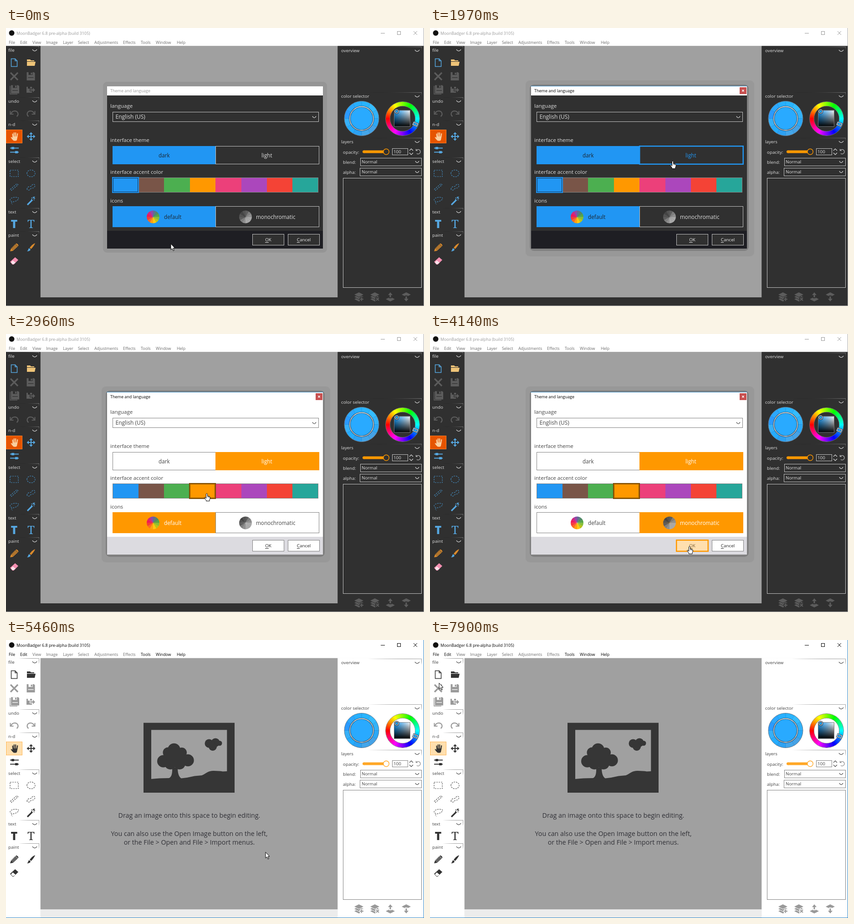
Write an HTML page with a canvas that moves like this. It is 918x610 px and loops after 8 s.

```html
<!DOCTYPE html>
<html lang="en">
<head>
<meta charset="utf-8">
<title>Theme and language</title>
<style>
html, body { margin: 0; width: 100%; height: 100%; overflow: hidden; }
canvas { display: block; }
</style>
</head>
<body>
<canvas id="stage" width="918" height="610"></canvas>
<script>
const c = document.getElementById('stage').getContext('2d');
const TAU = Math.PI * 2;
const LOOP = 8000;
const ORANGE = '#ff9800', BLUE = '#2196f3';
const SWATCHES = [BLUE, '#795548', '#4caf50', ORANGE, '#ec407a', '#ab47bc', '#f44336', '#26a69a'];

const DARK = {
  bg: '#303030', fg: '#dedede', line: '#c4c4c4', foot: '#1e1e23', rule: '#777', chosen: '#1d2731',
  icon: '#56a7e0', folder: '#efc478', off: '#5c5c5c', handBg: '#e65400', handEdge: '#ff7d26', hand: '#f9cf9f',
  dash: '#4489bb', pencil: '#d98a2c', brush: '#d98a2c', eraser: '#f48fb1', slider: ORANGE, status: '#303030', art: '#444'
};
const LIGHT = {
  bg: '#fff', fg: '#444', line: '#808080', foot: '#dcdbe0', rule: '#aaa', chosen: '#fff',
  icon: '#333', folder: '#333', off: '#9a9a9a', handBg: '#ffdfae', handEdge: '#ffb95c', hand: '#333',
  dash: '#555', pencil: '#333', brush: '#333', eraser: '#333', slider: '#ffa726', status: '#ececec', art: '#363636'
};

// time, x, y of the pointer tip
const POINTER = [
  [0, 362, 473], [150, 352, 472], [300, 342, 471], [610, 346, 466], [750, 368, 440], [900, 410, 400],
  [1050, 468, 345], [1200, 520, 300], [1350, 533, 291], [2240, 521, 304], [2370, 472, 336], [2500, 441, 349],
  [3110, 470, 372], [3240, 520, 400], [3370, 548, 414], [3820, 552, 425], [3980, 563, 452], [4140, 570, 465],
  [6080, 583, 464], [6220, 500, 460], [6360, 330, 448], [6500, 170, 432], [6640, 110, 422], [6780, 240, 412],
  [7060, 228, 396], [7200, 190, 340], [7340, 140, 265], [7480, 90, 195], [7620, 50, 140], [7760, 28, 105], [7900, 20, 94]
];

function box(x, y, w, h, fill, edge, lw = 1) {
  if (fill) { c.fillStyle = fill; c.fillRect(x, y, w, h); }
  if (edge) {
    c.strokeStyle = edge; c.lineWidth = lw;
    c.strokeRect(x + lw / 2, y + lw / 2, w - lw, h - lw);
  }
}
function shape(d, x, y, { fill, edge, w = 1, dash = [], flip = 1, cap = 'butt' }) {
  const p = new Path2D(d);
  c.save();
  c.translate(x, y);
  c.scale(flip, 1);
  c.lineCap = cap;
  if (fill) { c.fillStyle = fill; c.fill(p); }
  if (edge) { c.strokeStyle = edge; c.lineWidth = w; c.setLineDash(dash); c.stroke(p); }
  c.restore();
}
function disc(x, y, r, fill, edge, w = 1) {
  c.beginPath();
  c.arc(x, y, r, 0, TAU);
  if (fill) { c.fillStyle = fill; c.fill(); }
  if (edge) { c.strokeStyle = edge; c.lineWidth = w; c.stroke(); }
}
// y is the middle of the capitals
function text(s, x, y, size, color, align = 'left', font = '"Open Sans"', generic = 'sans-serif', weight = 400) {
  c.font = `${weight} ${size}px ${font}, ${generic}`;
  c.textAlign = align;
  c.fillStyle = color;
  c.fillText(s, x, y + size * 0.357);
}
function pie(x, y, r, colors) {
  colors.forEach((color, i) => {
    const a = i / colors.length * TAU - Math.PI / 2;
    c.beginPath();
    c.moveTo(x, y);
    c.arc(x, y, r, a, a + TAU / colors.length + 0.02);
    c.fillStyle = color;
    c.fill();
  });
}
const chevron = (x, y, color, w = 4) => shape(`M${-w} -2Q${-w / 2} 1.5 0 1.5T${w} -2`, x, y, { edge: color, w: 1.2 });

function header(label, x, y, x0, x1, th) {
  const g = c.createLinearGradient(x0, 0, x1, 0);
  g.addColorStop(0, 'transparent');
  g.addColorStop(1, th.rule);
  box(x0, y - 9, x1 - x0, 1, g);
  const v = c.createLinearGradient(0, y - 9, 0, y + 4);
  v.addColorStop(0, th.rule);
  v.addColorStop(1, 'transparent');
  box(x1 - 1, y - 9, 1, 13, v);
  text(label, x, y, 9.8, th.fg);
  chevron(x1 - 10, y, th.fg, 5);
}

function titleBar(active, ready) {
  box(0, 0, 918, 39.5, '#fff');
  const ink = active ? '#000' : '#999';
  disc(12.5, 11, 6, '#111');
  text('MoonBadger 6.8 pre-alpha (build 3105)', 23, 11.5, 8.9, ink);
  const menus = { File: 6, Edit: 31, View: 58, Image: 88, Layer: 125, Select: 158, Adjustments: 194, Effects: 257, Tools: 296, Window: 329, Help: 375 };
  for (const [name, x] of Object.entries(menus)) {
    const on = ready && /File|Edit|Tools|Window|Help/.test(name);
    text(name, x, 31.5, 8.9, on ? '#000' : '#6d6d6d');
  }
  box(823, 11, 9, 1, ink);
  box(859, 7, 8, 8, null, ink);
  shape('M-4 -4L4 4M4 -4L-4 4', 899, 11, { edge: ink });
}

function floppy(x, y, color, bg) {
  shape('M-9 -9H7L9 -7V9H-9Z', x, y, { fill: color });
  box(x - 5, y - 9, 9, 6, bg);
  box(x, y - 8, 3, 4, color);
  box(x - 6, y + 2, 12, 1.3, bg);
}

function toolbox(th, off) {
  box(0, 39.5, 75.5, 571, th.bg);
  [['file', 49], ['undo', 161], ['n-d', 212], ['select', 293], ['text', 404], ['paint', 455]]
    .forEach(([s, y]) => header(s, 5, y, 28, 73, th));
  const ink = th.icon;

  shape('M-6.5 -8.5H2L6.5 -4V8.5H-6.5ZM2 -8.5V-4H6.5', 18, 76, { edge: ink, w: 1.5 });
  shape('M-9 -7H-2L0 -5H7V-3H-9ZM-9 -2H10L8 7H-9Z', 55, 76, { fill: th.folder });
  shape('M-8 -8L8 8M8 -8L-8 8', 18, 106, { edge: off, w: 3.4 });
  floppy(54.5, 106, off, th.bg);
  floppy(20, 134.5, off, th.bg);
  shape('M-9 -9V9H7', 18, 136, { edge: off, w: 1.6 });
  shape('M-9 -7H3V-3H-2V3H3V6H-9ZM-6 -7V-3H-1V-7Z', 54, 136, { fill: off });
  shape('M-1 -1.5H5V-5L10 0L5 5V1.5H-1Z', 54, 136, { fill: off });
  [[18, 1], [55, -1]].forEach(([x, flip]) => {
    shape('M-7 1C-4 -7 8 -7 8.5 2Q8.5 5 5.5 7', x, 187, { edge: off, w: 2.2, flip });
    shape('M-8.5 -5V2H-1.5', x, 187, { edge: off, w: 2, flip });
  });

  box(0, 223, 36, 30, th.handBg, th.handEdge);
  shape('M-4.5 -5.5L-3.5 2M-1.2 -8V1M2.2 -8V1M6.3 -6L5 2', 19, 238, { edge: th.hand, w: 2.2, cap: 'round' });
  shape('M-4.5 0H6.2L5.5 5Q5 9.5 2 9.5H-1.5Q-4 9 -8.5 2Q-7.5 0 -4.5 3Z', 19, 238, { fill: th.hand });
  shape('M-7 0H7M0 -7V7', 55, 238, { edge: ink, w: 2 });
  shape('M0 -9.5L4 -5H-4ZM0 9.5L4 5H-4ZM-9.5 0L-5 -4V4ZM9.5 0L5 -4V4Z', 55, 238, { fill: ink });
  shape('M-9 -4.5H10M-9 4.5H10', 18, 268, { edge: ink, w: 2.2 });
  shape('M-6 -7H0V-2H-6ZM2 2H8V7H2Z', 18, 268, { fill: ink });

  const dashed = { edge: th.dash, w: 1.2, dash: [3, 2] };
  shape('M-9 -7H9V7H-9Z', 18, 319, dashed);
  shape('M-9 0A9 7.5 0 0 1 9 0A9 7.5 0 0 1 -9 0', 55, 319, dashed);
  shape('M-8.5 5L6 -7.5L8.5 -5L-6 7.5Z', 18, 349, dashed);
  shape('M-9 5Q-8 -1 -3 -1Q1 -1 2 -4Q5 -8 8 -5Q10 -1 5 2Q1 2 -1 4Q-5 9 -9 5', 55, 349, dashed);
  shape('M-5 3Q-12 0 -7 -4Q0 -8 8 -6Q13 -3 3 2L-4 4Q-8 6 -4 9', 18, 378, dashed);
  shape('M-8 9L3 -2', 55, 379, { edge: ink, w: 3.2 });
  shape('M5 -9V-5M1 -7L3 -5M9 -5H6M8 -9L6 -6M7 -1L6 -3M0 -3L2 -3', 55, 379, { edge: ink, w: 1.5 });

  text('T', 18, 430, 25, ink, 'center', '"Open Sans"', 'sans-serif', 800);
  text('T', 55, 430, 26, ink, 'center', '"Noto Serif"', 'serif');

  shape('M-9 9L-7 3L4 -8Q6 -9 9 -5Q10 -3 8 -2L-3 8Z', 18, 481, { fill: th.pencil });
  shape('M-6 4L5 -6M-4 6L7 -4M3 -7L8 -2', 18, 481, { edge: th.bg, w: 0.9 });
  shape('M9 -9Q3 -7 -3 1L0 4Q7 -3 9 -9Z', 55, 481, { fill: th.brush });
  shape('M-4 2L-1 5Q-2 9 -9 9Q-6 7 -6 4Z', 55, 481, { fill: th.icon });
  shape('M-9 2L2 -8L9 -2L-1 8H-4Z', 18, 511, { fill: th.eraser });
  shape('M-7 3L-3 -1L3 4L-1 7H-4Z', 18, 511, { fill: th === DARK ? '#fbe3ea' : '#fff' });
}

function colorWheels() {
  pie(781, 198.5, 38, ['#29b4ff', '#34bcff', '#33b2f8', '#2ba8f6', '#45a2e6', '#44a6ea',
    '#2da1f2', '#25acff', '#36b0f8', '#2b9aff', '#2ca8ff', '#28b0ff']);
  for (let i = 0; i < 12; i++) {
    const a = (i / 12 - 0.25) * TAU;
    c.beginPath();
    c.moveTo(781, 198.5);
    c.lineTo(781 + 38 * Math.cos(a), 198.5 + 38 * Math.sin(a));
    c.strokeStyle = 'rgba(20,90,150,.25)';
    c.lineWidth = 1;
    c.stroke();
  }
  disc(781, 198.5, 38, null, '#678');
  disc(781, 198.5, 26, '#29aaff', '#234', 3.2);
  disc(781, 198.5, 26, null, '#fff', 1.3);

  const hue = c.createConicGradient(Math.PI, 871, 199);
  for (let i = 0; i <= 12; i++) hue.addColorStop(i / 12, `hsl(${i * 30},100%,50%)`);
  disc(871, 199, 32.5, null, hue, 9.5);
  disc(871, 199, 37.5, null, '#777', 0.8);
  disc(871, 199, 27.7, null, '#777', 0.8);
  const sat = c.createLinearGradient(852, 0, 888, 0);
  sat.addColorStop(0, '#0d9bff');
  sat.addColorStop(1, '#fff');
  box(852, 180.5, 36, 36, sat);
  const val = c.createLinearGradient(0, 180.5, 0, 216.5);
  val.addColorStop(0, 'rgba(0,0,0,0)');
  val.addColorStop(1, '#000');
  box(852, 180.5, 36, 36, val, '#777');
  disc(858, 183, 4, '#29aaff', '#123', 3);
  disc(858, 183, 4, null, '#fff', 1.2);
  c.save();
  c.translate(899, 211);
  c.rotate(0.41);
  box(-6, -4.5, 12, 9, '#29aaff', '#123', 2.6);
  box(-5.3, -3.8, 10.6, 7.6, null, '#fff', 1.2);
  c.restore();
}

function sidePanel(th, off) {
  box(728.5, 39.5, 190, 571, th.bg);
  [['overview', 50], ['color selector', 150], ['layers', 250]].forEach(([s, y]) => header(s, 736, y, 795, 913, th));
  colorWheels();
  text('opacity:', 740, 272.5, 9.8, th.fg);
  shape('M2 0H46', 784, 271.5, { edge: th.slider, w: 6 });
  disc(786, 271.5, 3, th.slider);
  disc(835, 271.5, 6.2, th.bg, th.slider, 1.4);
  box(848, 264, 35, 15, th.bg, th.line);
  text('100', 851, 272, 9.8, th.fg);
  shape('M-4 -2.5L0 -6.5L4 -2.5M-4 2.5L0 6.5L4 2.5', 890, 271.5, { edge: th.fg, w: 1.2 });
  shape('M-4 -3A5 5 0 1 1 -3 4M-4.5 -6V-2.5H-1', 905, 271.5, { edge: th.line, w: 1.2 });
  [['blend:', 294], ['alpha:', 316]].forEach(([s, y]) => {
    text(s, 740, y + 1, 9.8, th.fg);
    box(s === 'blend:' ? 778 : 777, y - 9, s === 'blend:' ? 135 : 136, 18, th.bg, th.line);
    text('Normal', 781, y, 9.8, th.fg);
    chevron(903, y, th.fg);
  });
  box(740, 329, 173, 241, th.bg, th.line);

  const stack = 'M-10 -5L0 -10L10 -5L0 0ZM-10 0L-6 -2L0 1L6 -2L10 0L0 5ZM-10 5L-6 3L0 6L6 3L10 5L0 10Z';
  shape(stack, 775, 590, { fill: off });
  shape(stack, 810, 590, { fill: off });
  shape('M1 5H11M6 0V10', 775, 590, { edge: th.bg, w: 5 });
  shape('M2 5H10M6 1V9', 775, 590, { edge: off, w: 2 });
  shape('M2 1L10 9M10 1L2 9', 810, 590, { edge: th.bg, w: 5 });
  shape('M3 2L9 8M9 2L3 8', 810, 590, { edge: off, w: 2 });
  shape('M0 -10L5 -4H1.5V1H-1.5V-4H-5ZM-10 5L-3 1.5V3H3V1.5L10 5L0 10Z', 844, 590, { fill: off });
  shape('M0 10L5 4H1.5V-1H-1.5V4H-5ZM-10 -5L0 -10L10 -5L3 -1.5V-3H-3V-1.5Z', 879, 590, { fill: off });
}

function welcome(th) {
  const ink = th.art;
  box(302, 181.7, 200, 153.3, ink);
  box(319, 197.3, 166.3, 110, '#a0a0a0');
  shape('M319 305Q335 303 358 303Q366 300 365 280H377Q377 299 385 303.5Q400 302 414 298.5L430 297C440 293 443 287 456 287Q468 287 476 288.5L486 288V312H319Z', 0, 0, { fill: ink });
  [[369, 240.5, 13.8], [356, 247, 11.5], [386, 247, 11], [345.5, 266, 13.5], [399.5, 264, 13.2], [361, 271, 13], [381, 271, 13], [372, 258, 19],
    [446, 227, 9.5], [460, 225, 9.5], [469, 226.5, 5.5], [454, 234, 9]].forEach(([x, y, r]) => disc(x, y, r, ink));
  [['Drag an image onto this space to begin editing.', 385], ['You can also use the Open Image button on the left,', 424.5],
    ['or the File > Open and File > Import menus.', 444]].forEach(([s, y]) => text(s, 402.5, y, 14.25, '#303036', 'center'));
}

function choice(x, y, w, h, label, tx, s, on, hover) {
  box(x, y, w, h, on ? s.accent : s.th.bg, on ? s.accent : s.th.line);
  if (hover && !on) box(x - 1, y - 1, w + 2, h + 2, null, s.accent, 2.5);
  if (on && hover) box(x, y, w, h, null, 'rgba(255,255,255,.35)', 2);
  text(label, tx, y + h / 2 + 1, 11.7, on ? s.th.chosen : hover ? s.accent : s.th.fg);
}

function pushButton(x, label, s, hover) {
  box(x, 452, 70, 25, hover ? '#ffdfae' : s.th.bg, s.th.line);
  if (hover) box(x - 1, 451, 72, 27, null, s.accent, 2.5);
  const color = hover ? '#7d6034' : s.th === DARK ? '#eee' : '#222';
  text(label, x + 35, 465, 9.8, color, 'center');
  const left = x + 35 - c.measureText(label).width / 2;
  box(left, 470, c.measureText(label[0]).width, 1, color);
}

function dialog(s) {
  const { th, accent, active, over } = s;
  const shade = (x, y, w, h, a) => {
    c.beginPath();
    c.roundRect(x, y, w, h, 9);
    c.fillStyle = `rgba(0,0,0,${a})`;
    c.fill();
  };
  if (active) {
    shade(210, 115, 502, 386, 0.05);
    shade(219, 124, 481, 365, 0.16);
  } else shade(213, 118, 492, 375, 0.07);
  box(222, 128, 474, 356, th.bg);
  box(222, 128, 474, 20, '#fff');
  if (active) {
    box(221, 127, 476, 1, '#3386bd');
    box(680, 130, 15, 15, '#c75050');
    shape('M-2 -2L2 2M2 -2L-2 2', 687.5, 137.5, { edge: '#fff', w: 1.4 });
  }
  text('Theme and language', 229, 138, 9, active ? '#000' : '#999');
  box(222, 445, 474, 39, th.foot);

  [['language', 171], ['interface theme', 246], ['interface accent color', 315.5], ['icons', 378.5]]
    .forEach(([label, y]) => text(label, 229, y, 11.6, th.fg));
  box(234, 184, 453, 22, th.bg, th.line);
  text('English (US)', 240.5, 195, 12, th.fg);
  chevron(677, 195.5, th.fg);

  const isLight = th === LIGHT;
  choice(234, 259, 227, 40, 'dark', 335, s, !isLight, over(234, 259, 227, 40));
  choice(460, 259, 228, 40, 'light', 561, s, isLight, over(461, 259, 227, 40));

  SWATCHES.forEach((color, i) => box(Math.round(234.5 + i * 56.4), 329, 57, 32, color));
  box(234, 328, 452, 33, null, '#858585');
  SWATCHES.forEach((color, i) => {
    const x = Math.round(234 + i * 56.4) - 1;
    if (color === accent) {
      box(x, 327, 59, 35, accent, isLight ? '#6b4000' : accent, isLight ? 1.6 : 1);
      box(x + 2, 329, 55, 31, null, isLight ? '#8a5500' : '#143a60');
    } else if (over(x + 1, 328, 56, 33)) box(x, 327, 59, 35, null, accent, 2.5);
  });

  choice(234, 391, 227, 46, 'default', 347, s, !s.mono, over(234, 391, 227, 46));
  choice(460, 391, 228, 46, 'monochromatic', 549, s, s.mono, over(461, 391, 227, 46));
  pie(323, 414.5, 14, ['#5f7090', '#4f8a66', '#55a548', '#86bf38', '#b8c41c', '#ffc90f',
    '#ffa010', '#ff6a20', '#f53b38', '#f01858', '#d42480', '#8e4aa8']);
  pie(526, 414.5, 14, Array.from({ length: 12 }, (_, i) => {
    const v = Math.round(118 - 50 * Math.cos((i - 10) / 12 * TAU) + (i % 2) * 8);
    return `rgb(${v},${v},${v})`;
  }));
  pushButton(541, 'OK', s, over(541, 452, 70, 25));
  pushButton(619, 'Cancel', s, false);
}

function pointer(x, y, hand) {
  const look = { fill: '#fff', edge: '#000', w: 1 };
  if (hand) {
    shape('M-1.5 1.5Q0 -1 1.5 1.5V6L6 7.3Q8 8 7.3 11.5L6 14V17H-1.5V15L-5 10.5Q-5.5 8 -3.5 9L-1.5 11Z', x, y + 0.5, look);
    shape('M1.8 6V9M4 7V9.5M6 8V10', x, y + 0.5, { edge: '#000', w: 0.7 });
  } else shape('M0 0V13L3 10.3L5.2 15.3L7.2 14.5L5.2 9.5H9Z', x, y + 0.5, look);
}

function render(t) {
  const [, x, y] = POINTER.findLast(k => k[0] <= t);
  const open = t < 5160;
  const main = t < 5310 ? DARK : LIGHT;
  const off = !open && main === DARK ? '#4a4a4a' : main.off;
  const over = (l, top, w, h) => x >= l && x < l + w && y >= top && y < top + h;

  box(0, 0, 918, 610, main.status);
  box(75.5, 39.5, 653, 551.5, '#a0a0a0');
  titleBar(!open, t >= 5460);
  toolbox(main, off);
  sidePanel(main, off);
  const frame = open ? '#aaa' : '#2a84c8';
  box(917, 0, 1, 610, frame);
  box(0, 609, 918, 1, frame);
  if (open) {
    dialog({
      th: t < 2110 ? DARK : LIGHT,
      accent: t < 2960 ? BLUE : ORANGE,
      active: t >= 1970,
      mono: t >= 3670,
      over
    });
  } else welcome(main);

  const onControl = over(234, 259, 453, 40) || over(234, 328, 452, 33) || over(234, 391, 453, 46) || over(541, 452, 70, 25);
  pointer(x, y, open ? onControl : t < 5460);
}

const start = performance.now();
function tick() {
  render((performance.now() - start) % LOOP);
  requestAnimationFrame(tick);
}
tick();
</script>
</body>
</html>
```
